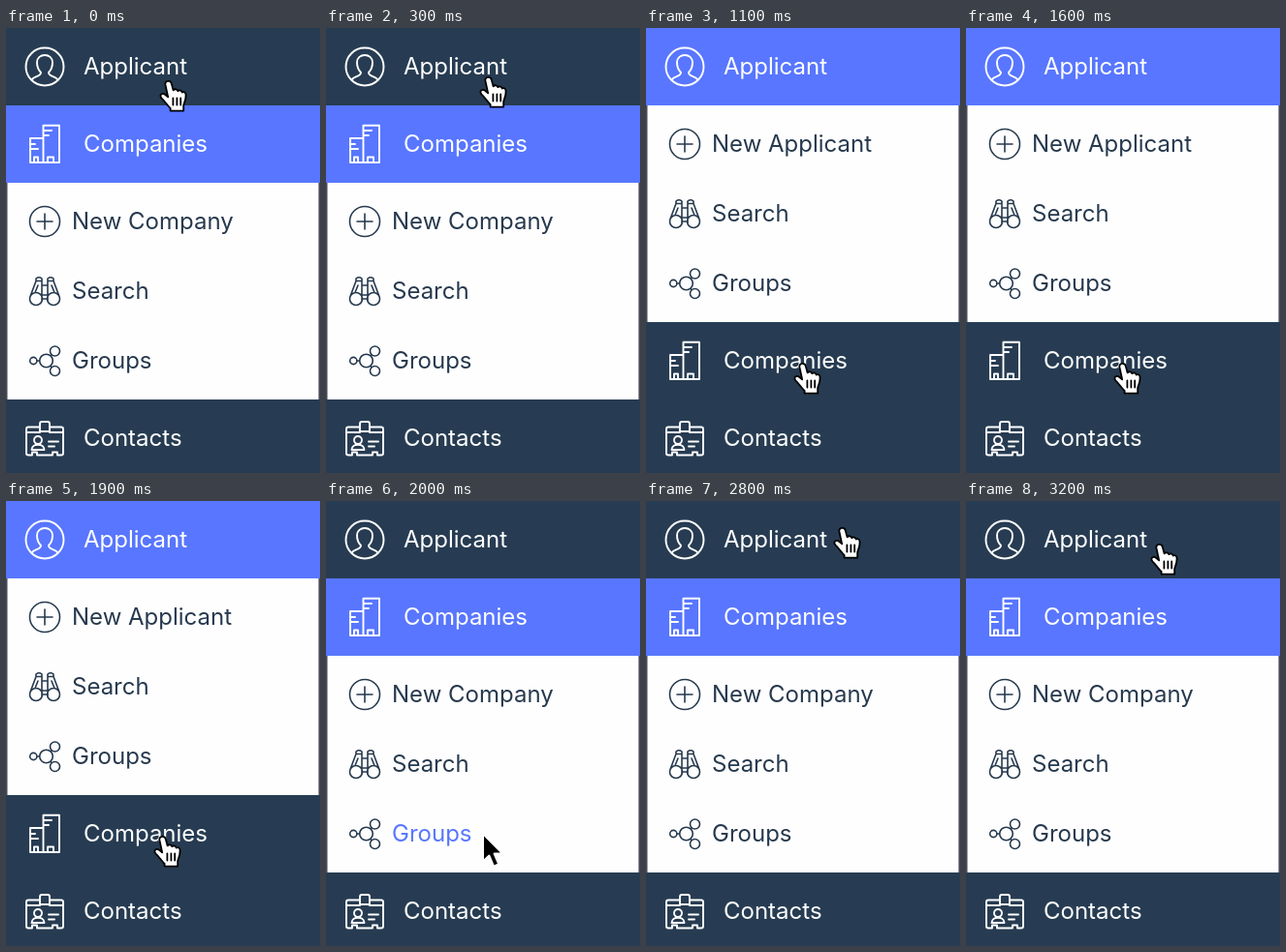
Recreate the animation shown at these times as an HTML page. Size 324x460 px, loop 3300 ms.

```html
<!DOCTYPE html>
<html lang="en">
<head>
<meta charset="utf-8">
<title>Accordion menu</title>
<style>
html, body { margin: 0; width: 100%; height: 100%; overflow: hidden; background: #273c52; }
svg { display: block; font: 24px Inter, "Liberation Sans", sans-serif; }
.bar { fill: #273c52; }
.bar.active { fill: #5876ff; }
.head text { fill: #fff; }
.head .icon { stroke: #fff; }
.item text { fill: #26394e; }
.item .icon { stroke: #26394e; }
.item.hover text { fill: #5876ff; }
.icon { fill: none; stroke-width: 1.9; stroke-linecap: round; stroke-linejoin: round; }
.item .icon { stroke-width: 1.6; }
</style>
</head>
<body>
<svg id="stage" width="324" height="460" viewBox="0 0 324 460">
  <g id="menu"></g>
  <g id="arrow">
    <path d="M0 0V28.5L6.4 22.6L11 33.6L16.2 31.4L11.6 20.6H20.3Z" fill="#000" stroke="#fff" stroke-width="2" stroke-linejoin="round"/>
  </g>
  <g id="hand">
    <path d="M-3.6 3.4C-4.2-.8 1.8-1.4 2.8 2.4L4.6 9.4C6 7.6 8.8 8 9.4 10.2C11 8.8 13.2 9.4 13.8 11.6C15.8 10.4 17.6 12 17.6 14.4C17.8 19 16.4 21.6 15.2 24.8V30.6H1.6V28C-1.4 25-4.2 20.6-7.4 17.6C-10.6 14.4-6.8 11.2-3.6 14L-.8 16.4Z" fill="#fff" stroke="#000" stroke-width="1.8" stroke-linejoin="round"/>
    <path d="M4.4 17.4V24.6M8.4 17.4V24.6M12.2 17.4V24.6" stroke="#000" stroke-width="1.8" stroke-linecap="round"/>
  </g>
</svg>
<script>
const LOOP = 3300, STEP = 100, OPEN_AT = 400, CLOSE_AT = 2000;
const HEAD = 80, ITEM = 72, PANEL = 224;

// Icons are drawn around (40, 0), the middle of their row.
const circle = (x, y, r) => `M${x - r} ${y}a${r} ${r} 0 1 0 ${2 * r} 0a${r} ${r} 0 1 0 ${-2 * r} 0`;
const icons = {
  person: circle(40, 0, 19.5) +
    'M26.5 14C28 9.5 36 10.5 36 6C33 3 32-1 32-4.5C32-14.5 48-14.5 48-4.5C48-1 47 3 44 6C44 10.5 52 9.5 53.5 14',
  buildings: 'M38.5 19V-19.2H55V19H25V-6H38.5M38.5-14H47M38.5-9H44M25 0H30M25 5H33M29 19V13.5H33V19M43 19V13.5H49V19',
  badge: 'M35-11.5H23Q21-11.5 21-9.5V15.5Q21 17.5 23 17.5H27V14.5H32V17.5H48V14.5H53V17.5H57Q59 17.5 59 15.5V-9.5Q59-11.5 57-11.5H45' +
    'M35-7V-15Q35-17 37-17H43Q45-17 45-15V-7ZM21-6H35M45-6H59M26.5 12C26.5 5 39.5 5 39.5 12ZM44 3.5H54M44 8.5H50' + circle(33, 2, 4),
  plus: circle(40, 0, 15.5) + 'M32 0H48M40-8V8',
  binoculars: circle(31, 8, 6.5) + circle(49, 8, 6.5) +
    'M24.8 6L31-10.5V-13Q34-15.5 37-13V10M55.2 6L49-10.5V-13Q46-15.5 43-13V10M31-10.5H37M43-10.5H49M37-6H43M37 4H43M37 8H43M33-6L30 1.5M47-6L50 1.5',
  nodes: circle(28.3, 0, 3.6) + circle(41.5, 0, 6.8) + circle(50.5, -10, 5) + circle(50.5, 10.5, 5) +
    'M32 0H34.7M46-5.2L47.2-6.3M46 5.2L47 6.7'
};

// Pointer path: time, x, y of the tip.
const path = [
  [0, 168, 55], [300, 168, 51], [400, 168, 47], [600, 168, 47], [700, 168, 60],
  [800, 168, 165], [900, 165, 260], [1000, 162, 335], [1100, 162, 347], [1900, 162, 347],
  [2000, 162, 344], [2200, 162, 344], [2300, 167, 285], [2400, 177, 190], [2500, 190, 77],
  [2600, 199, 30], [2700, 203, 18], [3000, 203, 48], [3200, 200, 45]
];
const arrowSpans = [[400, 600], [2000, 2200], [2500, 2500]];

const $ = id => document.getElementById(id);

function pointerAt(t) {
  const i = path.findIndex(p => p[0] >= t);
  const b = path[i], a = path[Math.max(i - 1, 0)];
  const k = b === a ? 0 : (t - a[0]) / (b[0] - a[0]);
  return [a[1] + (b[1] - a[1]) * k, a[2] + (b[2] - a[2]) * k];
}

const label = (y, x, icon, text) =>
  `<path class="icon" transform="translate(0 ${y})" d="${icons[icon]}"/><text x="${x}" y="${y + 8}">${text}</text>`;

function header(top, icon, text, active) {
  return `<g class="head"><rect class="bar ${active ? 'active' : ''}" y="${top}" width="324" height="${HEAD}"/>` +
    label(top + HEAD / 2, 80, icon, text) + '</g>';
}

function panel(top, noun, pointerY) {
  const items = [['plus', 'New ' + noun], ['binoculars', 'Search'], ['nodes', 'Groups']];
  const hovered = Math.floor((pointerY - top - 4) / ITEM);
  return `<rect y="${top}" width="324" height="${PANEL}" fill="#4b4b5b"/>` +
    `<rect x="1.5" y="${top}" width="321" height="${PANEL}" fill="#fefefe"/>` +
    items.map(([icon, text], i) =>
      `<g class="item ${i === hovered ? 'hover' : ''}">${label(top + 40 + i * ITEM, 68, icon, text)}</g>`).join('');
}

function draw(t) {
  const [x, y] = pointerAt(t);
  const first = t >= OPEN_AT && t < CLOSE_AT;
  const second = first ? HEAD + PANEL : HEAD;
  $('menu').innerHTML =
    header(0, 'person', 'Applicant', first) +
    header(second, 'buildings', 'Companies', !first) +
    header(HEAD * 2 + PANEL, 'badge', 'Contacts', false) +
    panel(first ? HEAD : HEAD * 2, first ? 'Applicant' : 'Company', y);

  const isArrow = arrowSpans.some(([a, b]) => t >= a && t <= b);
  for (const id of ['arrow', 'hand']) {
    $(id).setAttribute('transform', `translate(${x} ${y})`);
    $(id).style.display = (id === 'arrow') === isArrow ? '' : 'none';
  }
}

const start = performance.now();
let shown = -1;
function tick() {
  const t = Math.floor((performance.now() - start) % LOOP / STEP) * STEP;
  if (t !== shown) draw(shown = t);
  requestAnimationFrame(tick);
}
tick();
</script>
</body>
</html>
```
